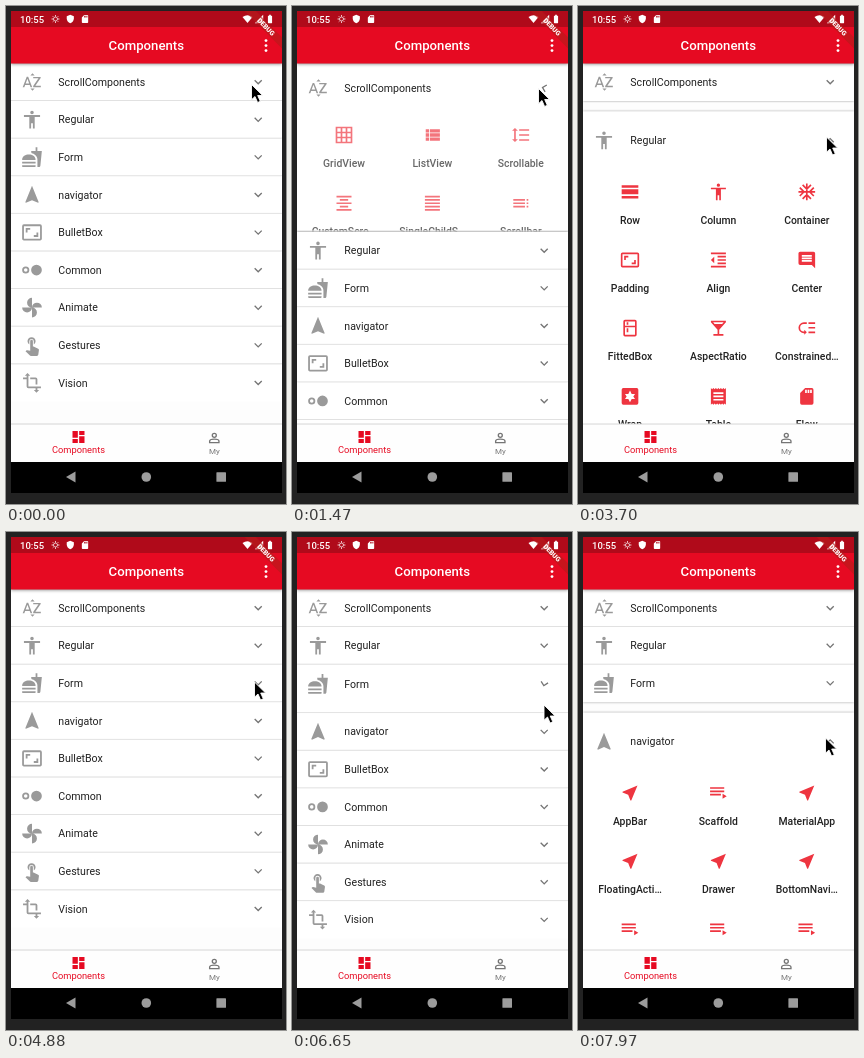
An HTML page for the animation above (8000 ms loop, 280x498 px).

```html
<!DOCTYPE html>
<html lang="en">
<head>
<meta charset="utf-8">
<title>Components</title>
<style>
html, body { margin: 0; width: 100%; height: 100%; overflow: hidden; background: #222; }
#stage { display: block; width: 280px; height: 498px; font-family: Roboto, sans-serif; }
.mid { text-anchor: middle; }
.item { font-size: 10.4px; font-weight: 500; fill: #222; }
.head { font-size: 10.6px; fill: #212121; }
.shade { filter: drop-shadow(0 .8px 1.2px rgba(0,0,0,.42)); }
.bar { filter: drop-shadow(0 1px 1.8px rgba(0,0,0,.38)); }
</style>
</head>
<body>
<svg id="stage" viewBox="0 0 280 498">
  <defs>
    <clipPath id="screen"><rect x="5" y="5" width="271" height="482"/></clipPath>
    <clipPath id="view"><rect x="5" y="57" width="271" height="361"/></clipPath>
  </defs>
  <rect width="280" height="498" fill="#222"/>
  <rect x="5" y="5" width="271" height="451" fill="#fdfdfd"/>
  <g id="list" clip-path="url(#view)"><g id="shades"></g><g id="panels"></g></g>
  <g clip-path="url(#screen)">
    <rect class="bar" x="5" y="21" width="271" height="36.5" fill="#e60a22"/>
    <rect x="5" y="5" width="271" height="16" fill="#b00a1a"/>
    <rect x="5" y="418" width="271" height="38" fill="#fefefe"/>
    <rect x="5" y="417.5" width="271" height="1" fill="#d6d6d6"/>
    <rect x="5" y="456" width="271" height="31" fill="#000"/>
    <g fill="#fff">
      <text x="14" y="16.8" font-size="9.5" font-weight="500">10:55</text>
      <text class="mid" x="140.3" y="44.3" font-size="13.2" font-weight="500">Components</text>
      <circle cx="260" cy="34.6" r="1.4"/><circle cx="260" cy="39.6" r="1.4"/><circle cx="260" cy="44.6" r="1.4"/>
    </g>
    <g id="bars"></g>
    <g class="mid" font-size="9.3">
      <text x="72.5" y="447.4" fill="#e60a22">Components</text>
      <text x="208.3" y="448.2" font-size="8" fill="#757575">My</text>
    </g>
    <g fill="#9c9c9c">
      <path d="M60 471l9.5-5.4v10.8z"/>
      <circle cx="140.3" cy="471" r="4.8"/>
      <rect x="210.4" y="466.2" width="9.6" height="9.6" rx=".6"/>
    </g>
    <g transform="translate(276 5) rotate(45)">
      <rect x="-26.5" y="18.5" width="53" height="8" fill="#b71c1c" fill-opacity=".63"/>
      <text class="mid" y="24.9" font-size="6.7" font-weight="900" fill="#fff">DEBUG</text>
    </g>
  </g>
  <path id="cursor" d="M0 0v15.2l3.5-3.2 2.6 6 2.7-1.2-2.6-5.8h4.9z" fill="#000" stroke="#fff" stroke-width=".9"/>
</svg>
<script>
// 24-unit icons; a leading "~" means stroked
const ICONS = {
  alpha: 'M14.94 4.66h-4.72l2.36-2.36zm-4.69 14.71h4.66l-2.33 2.33zM6.1 6.27L1.6 17.73h1.84l.92-2.45h5.11l.92 2.45h1.84L7.74 6.27zm-1.13 7.37l1.94-5.18 1.94 5.18zm10.76 2.5h6.12v1.59h-8.53v-1.29l5.92-8.56h-5.88v-1.6h8.3v1.26z',
  person: 'M12 2a2 2 0 1 1 0 4 2 2 0 0 1 0-4zm9 7h-6v13h-2v-6h-2v6H9V9H3V7h18z',
  food: 'M18.06 23h1.66c.84 0 1.53-.64 1.63-1.46L23 5.05h-5V1h-1.97v4.05h-4.97l.3 2.34c1.71.47 3.31 1.32 4.27 2.26 1.44 1.42 2.43 2.89 2.43 5.29zM1 22v-1h15v1q0 1-1 1H2q-1 0-1-1zm15-7c0-8-15-8-15 0zM1 17h15v2H1z',
  compass: 'M12 2L4.5 20.3l.7.7L12 18l6.8 3 .7-.7z',
  ratio: 'M19 12h-2v3h-3v2h5zM7 9h3V7H5v5h2zm14-6H3a2 2 0 0 0-2 2v14a2 2 0 0 0 2 2h18a2 2 0 0 0 2-2V5a2 2 0 0 0-2-2zm0 16H3V5h18z',
  dots: 'M17 6a6 6 0 1 0 0 12 6 6 0 0 0 0-12zM5 8a4 4 0 1 0 0 8 4 4 0 0 0 0-8zm0 6a2 2 0 1 1 0-4 2 2 0 0 1 0 4z',
  toy: 'M12 12a5.5 5.5 0 0 1 11 0zm0 0a5.5 5.5 0 0 1-11 0zm0 0a5.5 5.5 0 0 1 0-11zm0 0a5.5 5.5 0 0 1 0 11z',
  touch: 'M9 11.24V7.5a2.5 2.5 0 0 1 5 0v3.74a4.5 4.5 0 1 0-5 0zm9.84 4.63l-4.54-2.26-.54-.11H13v-6a1.5 1.5 0 0 0-3 0v10.74l-3.43-.72q-.6-.1-1 .3l-.8.8 4.94 4.94q.4.44 1.06.44h6.79q1.2 0 1.44-1.28l.75-5.27q.1-1.1-.91-1.58z',
  crop: 'M22 18v-2H8V4h2L7 1 4 4h2v2H2v2h4v8a2 2 0 0 0 2 2h8v2h-2l3 3 3-3h-2v-2zM10 8h6v6h2V8a2 2 0 0 0-2-2h-6z',
  grid: '~M3 3h18v18H3zM3 9h18M3 15h18M9 3v18M15 3v18',
  rows: 'M4 5h4v4H4zm0 5h4v4H4zm0 5h4v4H4zM9 5h12v4H9zm0 5h12v4H9zm0 5h12v4H9z',
  spacing: 'M6 7h2.5L5 3.5 1.5 7H4v10H1.5L5 20.5 8.5 17H6zm4-2v2h12V5zm0 14h12v-2H10zm0-6h12v-2H10z',
  center: '~M3 4h18M7 8h10M3 12h18M7 16h10M3 20h18',
  justify: '~M3 4h18M3 8h18M3 12h18M3 16h18M3 20h18',
  toc: '~M3 8h14M3 12h14M3 16h14M19 8h2M19 12h2M19 16h2',
  day: 'M2 4h20v3H2zM2 9h20v6H2zM2 17h20v3H2z',
  snow: '~M2 12h20M12 2v20M7 3.6l5 5 5-5M7 20.4l5-5 5 5M3.6 7l5 5-5 5M20.4 7l-5 5 5 5',
  indent: 'M11 17h10v-2H11zm-8-5l4 4V8zm0 9h18v-2H3zM3 3v2h18V3zm8 6h10V7H11zm0 4h10v-2H11z',
  note: 'M22 4a2 2 0 0 0-2-2H4a2 2 0 0 0-2 2v12a2 2 0 0 0 2 2h14l4 4zM18 14H6v-2h12zm0-3H6V9h12zm0-3H6V6h12z',
  fridge: 'M18 2H6a2 2 0 0 0-2 2v16a2 2 0 0 0 2 2h12a2 2 0 0 0 2-2V4a2 2 0 0 0-2-2zm0 18H6v-9h12zm0-11H6V4h12zM8 5h2v3H8zm0 7h2v5H8z',
  glass: 'M21 5V3H3v2l8 9v5H6v2h12v-2h-5v-5zM7.4 7L5.7 5h12.6l-1.8 2z',
  low: 'M14 5h8v2h-8zm0 5.5h8v2h-8zm0 5.5h8v2h-8zM2 11.5A6.5 6.5 0 0 0 8.5 18H9v2l3-3-3-3v2h-.5a4.5 4.5 0 0 1 0-9H12V5H8.5A6.5 6.5 0 0 0 2 11.5z',
  wrap: 'M4 2h16a2 2 0 0 1 2 2v16a2 2 0 0 1-2 2H4a2 2 0 0 1-2-2V4a2 2 0 0 1 2-2zM12 5l-2 4H6l2 3-2 3h4l2 4 2-4h4l-2-3 2-3h-4z',
  receipt: 'M18 17H6v-2h12zm0-4H6v-2h12zm0-4H6V7h12zM3 22l1.5-1.5L6 22l1.5-1.5L9 22l1.5-1.5L12 22l1.5-1.5L15 22l1.5-1.5L18 22l1.5-1.5L21 22V2l-1.5 1.5L18 2l-1.5 1.5L15 2l-1.5 1.5L12 2l-1.5 1.5L9 2 7.5 3.5 6 2 4.5 3.5 3 2z',
  card: 'M18 2h-8L4 8v12a2 2 0 0 0 2 2h12a2 2 0 0 0 2-2V4a2 2 0 0 0-2-2zm-6 6h-2V4h2zm3 0h-2V4h2zm3 0h-2V4h2z',
  near: 'M21 3L3 10.5v1l6.8 2.7 2.7 6.8h1z',
  play: 'M19 9H2v2h17zm0-4H2v2h17zM2 15h13v-2H2zm15-2v6l5-3z',
  more: 'M16.6 8.6L12 13.2 7.4 8.6 6 10l6 6 6-6z',
  gear: '~M12 7a5 5 0 1 0 .01 0zM12 2v4M12 18v4M2 12h4M18 12h4M5 5l2.5 2.5M16.5 16.5L19 19M5 19l2.5-2.5M16.5 7.5L19 5',
  shield: 'M12 1L3 5v6c0 5.5 3.8 10.7 9 12 5.2-1.3 9-6.5 9-12V5z',
  wifi: 'M12 21.5L0 7q12-8.5 24 0z',
  signal: 'M2 22h20V2z',
  battery: 'M16 4h-2V2h-4v2H8q-1 0-1 1v16q0 1 1 1h8q1 0 1-1V5q0-1-1-1z',
  board: 'M3 3h8v10H3zm0 12h8v6H3zm10-4h8v10h-8zm0-8h8v6h-8z',
  user: '~M12 5a3 3 0 1 1 0 6 3 3 0 0 1 0-6zM5 19v-2c0-2 4-3.2 7-3.2s7 1.2 7 3.2v2z'
};

// Panels: icon, title, items, [open, close] times in ms
const PANELS = [
  ['alpha', 'ScrollComponents', 'grid GridView,rows ListView,spacing Scrollable,center CustomScro…,justify SingleChildS…,toc Scrollbar,rows PageView,justify NestedScrol…,toc Refresh', 250, 1414],
  ['person', 'Regular', 'day Row,person Column,snow Container,ratio Padding,indent Align,note Center,fridge FittedBox,glass AspectRatio,low Constrained…,wrap Wrap,receipt Table,card Flow,day Stack,rows Expanded,grid Baseline,ratio SizedBox,note Text,center Icon', 2436, 3960],
  ['food', 'Form', 'note TextField,grid Checkbox,dots Radio,toc Switch,spacing Slider,receipt Form', 4990, 6514],
  ['compass', 'navigator', 'near AppBar,play Scaffold,near MaterialApp,near FloatingActi…,near Drawer,near BottomNavi…,play TabBar,play TabBarView,play SliverAppBar', 7430],
  ['ratio', 'BulletBox'], ['dots', 'Common'], ['toy', 'Animate'], ['touch', 'Gestures'], ['crop', 'Vision']
];

// Pointer path: time, x, y
const POINTER = [
  [0, 245.5, 78.5], [740, 245.5, 78.5], [1330, 246.5, 82.5], [1620, 246.5, 82.5], [2350, 249, 111.5],
  [2800, 249, 111.5], [3400, 249, 130], [3695, 248.5, 131], [4580, 248.5, 131], [4877, 248.5, 150],
  [5180, 248.5, 150], [5615, 250, 174], [5764, 250, 174], [6060, 222.5, 197], [6207, 252, 173],
  [6660, 252, 173], [6950, 251, 180], [7100, 251, 180], [7240, 249, 187], [7540, 249, 187], [7970, 247.5, 206]
];

const LOOP = 8000, STEP = 147.8, MOVE = 200;
const TOP = 57.4, ROW = 37.6, GAP = 10.4, CELL = 68.2;
const $ = id => document.getElementById(id);
const clamp = v => Math.min(1, Math.max(0, v));

function icon(name, x, y, size, color) {
  const d = ICONS[name], line = d[0] === '~', k = size / 24;
  const paint = line ? `fill="none" stroke="${color}" stroke-width="2"` : `fill="${color}" fill-rule="evenodd"`;
  return `<path transform="translate(${x - size / 2} ${y - size / 2}) scale(${k})" d="${line ? d.slice(1) : d}" ${paint}/>`;
}

function add(parent, tag, attrs, html = '') {
  const el = document.createElementNS('http://www.w3.org/2000/svg', tag);
  set(el, attrs);
  el.innerHTML = html;
  return parent.appendChild(el);
}

function set(el, attrs) {
  for (const key in attrs) el.setAttribute(key, attrs[key]);
}

// Cubic bezier (.4, 0, .2, 1)
function ease(x) {
  if (x <= 0 || x >= 1) return clamp(x);
  let lo = 0, hi = 1;
  for (let i = 0; i < 24; i++) {
    const s = (lo + hi) / 2, r = 1 - s;
    if (1.2 * r * r * s + .6 * r * s * s + s * s * s < x) lo = s; else hi = s;
  }
  return lo * lo * (3 - 2 * lo);
}

function cell(item, i) {
  const [name, label] = item.split(' ');
  const x = 47 + i % 3 * 88.4, y = Math.floor(i / 3) * CELL;
  return icon(name, x, y + 22, 20, '#ee3540') +
    `<text class="item mid" x="${x}" y="${y + 54}">${label}</text>`;
}

const panels = PANELS.map(([name, title, list = '', open = Infinity, close = Infinity], i) => {
  const items = list ? list.split(',') : [];
  const shade = i < PANELS.length - 1 &&
    add($('shades'), 'rect', { class: 'shade', x: 5, width: 271, fill: '#fff' });
  const box = add($('panels'), 'svg', { x: 5, width: 271, overflow: 'hidden' });
  add(box, 'rect', { width: 271, height: '100%', fill: '#fff' });
  const body = add(box, 'g', {}, items.map(cell).join(''));
  const head = add(box, 'g', {}, icon(name, 21, 18.6, 21.5, '#9a9a9a') +
    `<text class="head" x="47.3" y="22.4">${title}</text>`);
  const arrow = add(head, 'g', {}, icon('more', 0, 0, 16, '#757575'));
  const rule = add(box, 'rect', { width: 271, height: .9, fill: '#dedede' });
  return { shade, box, body, head, arrow, rule, open, close, tall: Math.ceil(items.length / 3) * CELL };
});

$('bars').innerHTML = [
  ['gear', 49.5, 13, 9.5, '#fff'], ['shield', 64.3, 13, 9.5, '#fff'], ['card', 79, 13, 9.5, '#fff'],
  ['wifi', 241.5, 13, 10, '#fff'], ['signal', 253, 13, 10, '#fff'], ['battery', 264, 13, 10, '#fff'],
  ['board', 72.5, 431, 16, '#e60a22'], ['user', 208.3, 432, 16, '#757575']
].map(a => icon(...a)).join('');

// Expansion: size, fade and gap of a panel
function state(p, t) {
  const closing = t >= p.close;
  const u = clamp((t - (closing ? p.close : p.open)) / MOVE);
  const flip = v => closing ? 1 - v : v;
  return { size: flip(ease(u)), gap: flip(ease(clamp(u * 2.2))), fade: Math.sqrt(clamp((flip(u) - .4) / .6)) };
}

function drawList(t) {
  const states = panels.map(p => state(p, t));
  let y = TOP;
  panels.forEach((p, i) => {
    const { size, gap, fade } = states[i];
    const pad = GAP * size, height = ROW + pad * 2 + p.tall * size;
    const below = Math.max(gap, i + 1 < panels.length ? states[i + 1].gap : 1);
    if (i) y += GAP * gap;
    set(p.box, { y, height });
    if (p.shade) set(p.shade, { y, height });
    set(p.head, { transform: `translate(0 ${pad})` });
    set(p.body, { transform: `translate(0 ${ROW + pad * 2})`, opacity: fade });
    set(p.arrow, { transform: `translate(247.2 18.6) rotate(${180 * size})` });
    set(p.rule, { y: height - .9, opacity: 1 - below });
    y += height + GAP * gap;
  });
}

function drawPointer(t) {
  let i = 1;
  while (i < POINTER.length - 1 && POINTER[i][0] < t) i++;
  const [t0, x0, y0] = POINTER[i - 1], [t1, x1, y1] = POINTER[i];
  const u = clamp((t - t0) / (t1 - t0));
  set($('cursor'), { transform: `translate(${x0 + (x1 - x0) * u} ${y0 + (y1 - y0) * u})` });
}

let last = -1;
function tick() {
  const step = Math.floor((performance.now() % LOOP + 16) / STEP);
  if (step !== last) {
    last = step;
    drawList(step * STEP);
    drawPointer(step * STEP);
  }
  requestAnimationFrame(tick);
}
tick();
</script>
</body>
</html>
```
